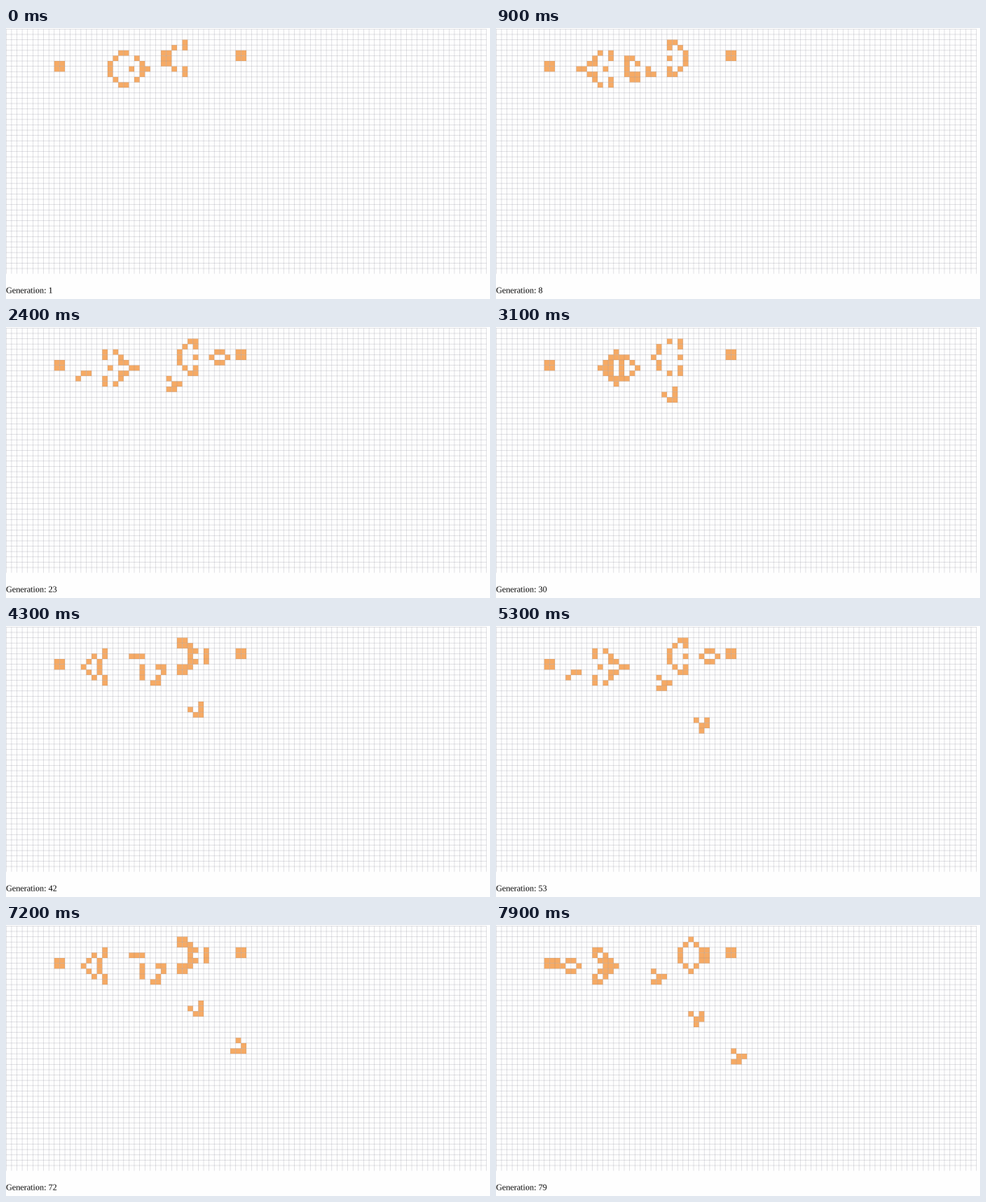
A matplotlib script for the animation above (8000 ms loop, 600x337 px).

```python
import numpy as np
import matplotlib.pyplot as plt
from matplotlib.animation import FuncAnimation
from matplotlib.collections import LineCollection
from matplotlib.colors import ListedColormap
from matplotlib.patches import PathPatch
from matplotlib.textpath import TextPath
from matplotlib.transforms import IdentityTransform

W, H = 600, 337
COLS, ROWS = 90, 46
CELL = 6.615
X0, Y0 = 0.25, 1.35
FRAMES, STEP_MS = 80, 100
FONT_PX, BASELINE = 10.58, 329.6

# Gosper glider gun, placed with its corner at column 9, row 2
GUN = """
........................#...........
......................#.#...........
............##......##............##
...........#...#....##............##
##........#.....#...##..............
##........#...#.##....#.#...........
..........#.....#.......#...........
...........#...#....................
............##......................
""".split()


def first_board():
    board = np.zeros((ROWS, COLS), int)
    for r, line in enumerate(GUN):
        for c, mark in enumerate(line):
            board[r + 2, c + 9] = mark == "#"
    return board


def evolve(board):
    near = sum(np.roll(board, (dy, dx), (0, 1))
               for dy in (-1, 0, 1) for dx in (-1, 0, 1)) - board
    return ((near == 3) | ((near == 2) & (board == 1))).astype(int)


def generation(i):
    """The first board holds for three ticks; one generation is skipped later."""
    return max(1, i - 1) + (i >= 46)


def label_path(n):
    return TextPath((0, H - BASELINE), f"Generation: {n}", size=FONT_PX,
                    prop={"family": "Liberation Serif"})


boards = [first_board()]
while len(boards) < generation(FRAMES - 1):
    boards.append(evolve(boards[-1]))

fig = plt.figure(figsize=(W / 100, H / 100), dpi=100, facecolor="#fefefe")
ax = fig.add_axes([0, 0, 1, 1])
ax.axis("off")

xs = X0 + CELL * np.arange(COLS + 1)
ys = Y0 + CELL * np.arange(ROWS + 1)
cells = ax.pcolormesh(xs, ys, boards[0], vmin=0, vmax=1, zorder=1,
                      antialiased=True, snap=False,
                      cmap=ListedColormap([(1, 1, 1, 0), "#f6aa64"]))

lines = [[(x, ys[0]), (x, ys[-1])] for x in xs]
lines += [[(xs[0], y), (xs[-1], y)] for y in ys[:-1]]
grid = LineCollection(lines, colors=[(0.38, 0.38, 0.46, 0.23)],
                      linewidths=0.7 * 0.72, zorder=2)
grid.set_snap(False)
ax.add_collection(grid, autolim=False)

ax.set_xlim(0, W)
ax.set_ylim(H, 0)

label = PathPatch(label_path(1), facecolor="black", linewidth=0, zorder=3,
                  transform=IdentityTransform(), snap=False)
ax.add_artist(label)
label.set_transform(IdentityTransform())


def draw(i):
    n = generation(i)
    cells.set_array(boards[n - 1])
    label.set_path(label_path(n))
    return cells, label


anim = FuncAnimation(fig, draw, frames=FRAMES, interval=STEP_MS,
                     repeat=True, repeat_delay=0, blit=False)
plt.show()
```
